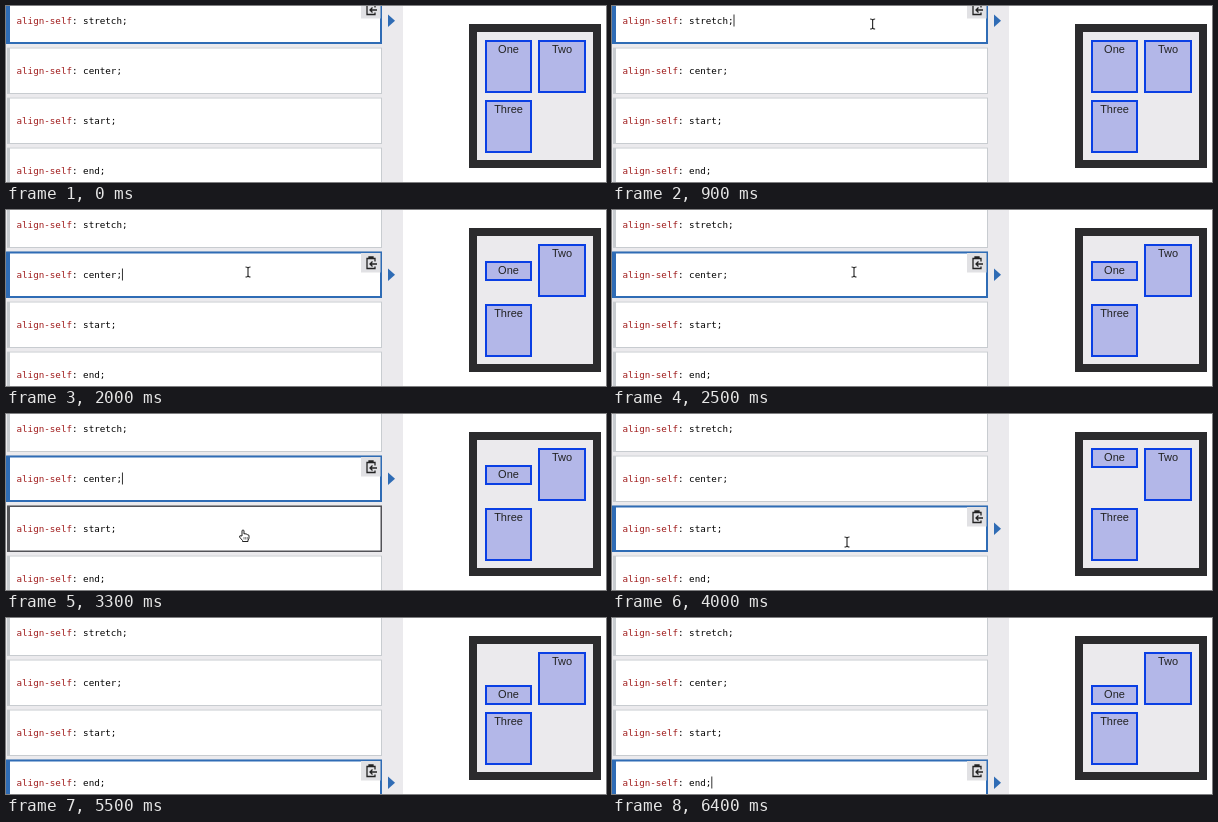
Recreate the animation shown at these times as an HTML page. Size 600 px wide and 176 px high, loop 6500 ms.

```html
<!DOCTYPE html>
<html lang="en">
<head>
<meta charset="utf-8">
<title>align-self demo</title>
<style>
  html, body { margin: 0; width: 100%; height: 100%; overflow: hidden; background: #fff; }
  svg { display: block; }
  .code { font: 9.22px "DejaVu Sans Mono", monospace; white-space: pre; }
  .prop { fill: #a01c1c; }
  .item rect { fill: #b3b7e8; stroke: #0a3fe4; stroke-width: 2; }
  .item text { font: 11px "Liberation Sans", Arial, sans-serif; text-anchor: middle; fill: #222; }
  .base { fill: #c8ccd0; }
  .hover { fill: #535358; }
  .active, .arrow { fill: #2f6cb5; }
</style>
</head>
<body>
<svg id="stage" width="600" height="176" viewBox="0 0 600 176">
  <rect width="600" height="176" fill="#fff"/>
  <rect width="397" height="176" fill="#ebeaed"/>
  <g id="rows"></g>
  <rect x="467" y="22" width="124" height="136" fill="#ebeaed" stroke="#2b2b2d" stroke-width="8"/>
  <g id="items"></g>
  <g id="arrowCursor">
    <path d="M0 0V12L3 9.500L5 14L7 13L5 9H9Z" fill="#111" stroke="#fff"/>
  </g>
  <g id="beam" fill="none">
    <path d="M-2.500-5Q0-5 0-3.500Q0-5 2.500-5M0-3.500V3.500M-2.500 5Q0 5 0 3.500Q0 5 2.500 5" stroke="#222" stroke-width="1.100"/>
  </g>
  <g id="hand">
    <path d="M-1 6V1Q-1 0 0 0T1 1V4Q2 3 3 4.200Q4 3.600 4.700 4.800Q6 4.500 6 6V8Q6 9 5 10V11.500H-.500V10.500L-3.500 7Q-3.500 5.200-2 5.800Z"
      fill="#fff" stroke="#222" stroke-width="1" stroke-linejoin="round"/>
    <path d="M1 7V9.500M2.700 7V9.500M4.300 7V9.500" stroke="#222" stroke-width=".600"/>
  </g>
</svg>
<script>
const LOOP = 6500, STEP = 100, FADE = 180, BLINK = 510;
const values = ["stretch", "center", "start", "end"];
const charWidth = 5.55;
const selectAt = [-1000, 1790, 3480, 4970];
const focusAt = [400, ...selectAt.slice(1)];
const itemOne = [[34, 53], [51, 20], [34, 20], [67, 20]];   // top, height per value
const path = [
  [0, 420, 200], [100, 420, 180], [250, 385, 24], [400, 262, 18], [1200, 260, 18],
  [1480, 242, 62], [2600, 242, 62], [3200, 237, 116], [3700, 237, 116],
  [4000, 235, 128], [4300, 232, 160], [5200, 232, 160], [5500, 230, 195], [LOOP, 230, 195]
];
const $ = id => document.getElementById(id);
const clamp = v => Math.max(0, Math.min(1, v));
const rowTop = i => 50 * i - 8.5;

const frame = (name, x, left, edge) =>
  `<path class="${name}" fill-rule="evenodd" d="M${x} 0H376V46.500H${x}ZM${left} ${edge}V${46.5 - edge}H${376 - edge}V${edge}Z"/>`;

$("rows").innerHTML = values.map((value, i) => `
  <g transform="translate(0 ${rowTop(i)})">
    <rect x="1" width="375" height="46.500" fill="#fff"/>
    ${frame("base", 1, 4, 1)}${frame("hover", 1, 4, 1.5)}${frame("active", 0, 4, 2)}
    <text class="code" x="10.500" y="26.500"><tspan class="prop">align-self</tspan>: ${value};</text>
    <rect class="caret" x="${11 + charWidth * (value.length + 13) - 0.5}" y="17" width="1" height="12" fill="#333"/>
    <g class="copy">
      <rect x="355" y="1.500" width="19.500" height="19.500" fill="#e1e1e4"/>
      <path d="M369 10V7H361V17H369V15M363 7V5.500H367V7M371 12.500H364M366.500 10L364 12.500L366.500 15"
        fill="none" stroke="#222" stroke-width="1.300"/>
    </g>
    <path class="arrow" d="M382 17L389 23.250L382 29.500Z"/>
  </g>`).join("");

const item = (name, x, y, w) => `<g class="item" transform="translate(${x} ${y})">
  <rect x="1" y="1" width="${w - 2}" height="51"/><text x="${w / 2}" y="13">${name}</text></g>`;
$("items").innerHTML = item("One", 479, 34, 47) + item("Two", 532, 34, 48) + item("Three", 479, 94, 47);

const one = $("items").firstElementChild;
const rows = [...$("rows").children].map(row => {
  const parts = {};
  for (const name of ["hover", "active", "caret", "copy", "arrow"]) parts[name] = row.querySelector("." + name);
  return parts;
});
const show = (el, opacity) => el.setAttribute("opacity", +opacity);

function pointer(t) {
  const k = path.findIndex(p => p[0] > t);
  const [t0, x0, y0] = path[k - 1], [t1, x1, y1] = path[k];
  const u = (t - t0) / (t1 - t0), e = u * u * (3 - 2 * u);
  return [x0 + (x1 - x0) * e, y0 + (y1 - y0) * e];
}

function draw(t) {
  const selected = selectAt.filter(s => s <= t).length - 1;
  const p = clamp((t - selectAt[selected]) / FADE);
  const age = t - focusAt[selected];
  const caretOn = age >= 0 && Math.floor(age / BLINK) % 2 === 0;
  const [x, y] = pointer(t);
  const over = x < 376 ? values.findIndex((_, i) => y >= rowTop(i) && y < rowTop(i) + 46.5) : -1;

  rows.forEach((row, i) => {
    const on = i === selected;
    const fading = i === selected - 1 ? 1 - p * p : 0;
    show(row.active, on || fading);
    show(row.arrow, on ? p : fading);
    row.arrow.setAttribute("transform", `translate(${on ? -6 * (1 - p) : 0} 0)`);
    show(row.hover, !on && i === over);
    show(row.caret, on && caretOn);
    show(row.copy, on);
  });

  const [top, height] = itemOne[selected];
  one.setAttribute("transform", `translate(479 ${top})`);
  one.firstElementChild.setAttribute("height", height - 2);

  const shape = over < 0 ? "arrowCursor" : over === selected ? "beam" : "hand";
  for (const id of ["arrowCursor", "beam", "hand"]) {
    show($(id), id === shape);
    $(id).setAttribute("transform", `translate(${x} ${y})`);
  }
}

const start = performance.now();
function tick() {
  const t = Math.max(0, performance.now() - start) % LOOP;
  draw(Math.floor(t / STEP) * STEP);
  requestAnimationFrame(tick);
}
tick();
</script>
</body>
</html>
```
